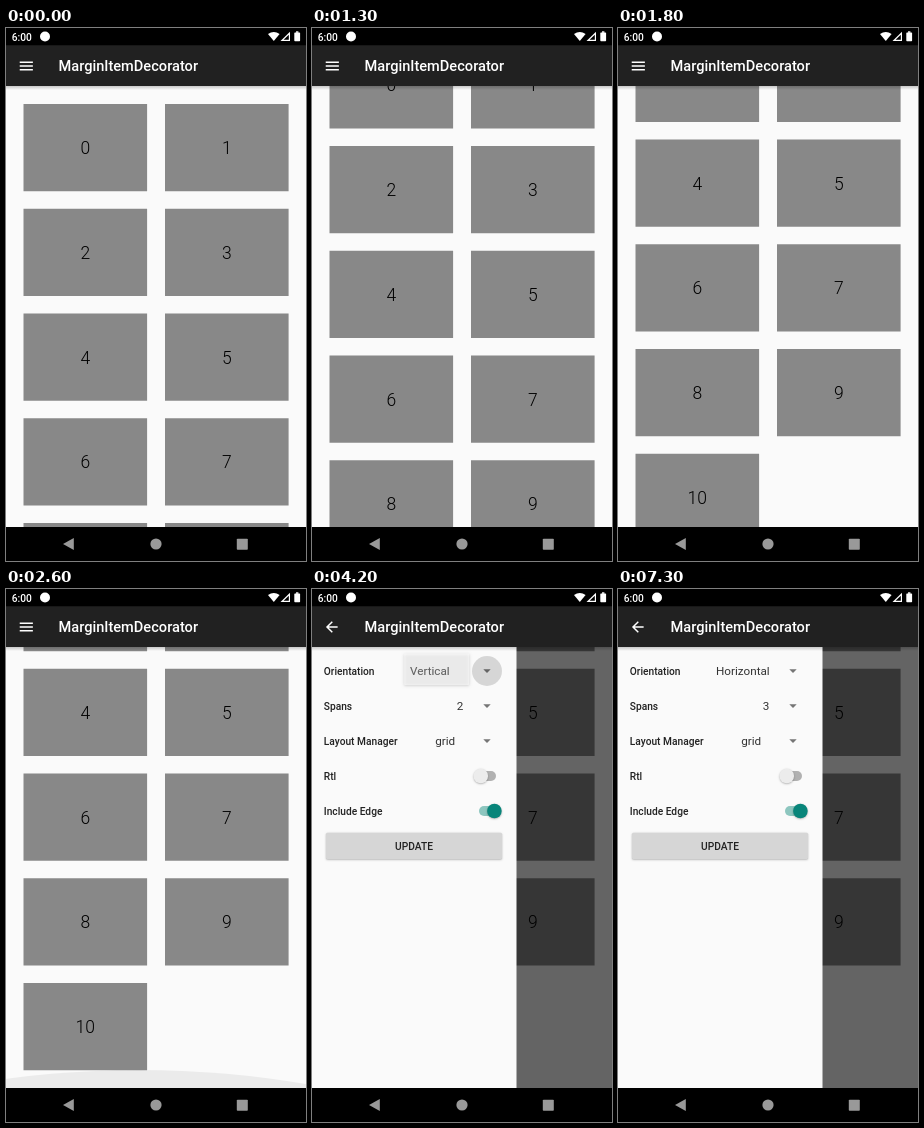
These frames come from a looping animation (300x533 px, 8000 ms). An HTML page with a canvas:

```html
<!DOCTYPE html>
<html lang="en">
<head>
<meta charset="utf-8">
<title>MarginItemDecorator</title>
<style>
  html, body { margin: 0; width: 100%; height: 100%; overflow: hidden; background: #000; }
  canvas { display: block; width: 100vw; height: 100vh; }
</style>
</head>
<body>
<canvas id="stage"></canvas>
<script>
const W = 300, H = 533, LOOP = 8000, STEP = 100;
const BAR_BOTTOM = 58, NAV_TOP = 499, DRAWER_WIDTH = 204.5, DP = 0.73;
const canvas = document.getElementById('stage');
const ctx = canvas.getContext('2d');

const clamp = v => Math.max(0, Math.min(1, v));
const lerp = (a, b, p) => a + (b - a) * p;

// Piecewise linear track of [time, value] pairs.
function track(t, keys) {
  if (t <= keys[0][0]) return keys[0][1];
  for (let i = 1; i < keys.length; i++) {
    const [t0, v0] = keys[i - 1], [t1, v1] = keys[i];
    if (t <= t1) return lerp(v0, v1, (t - t0) / (t1 - t0));
  }
  return keys[keys.length - 1][1];
}

function rect(x, y, w, h, color, radius = 0) {
  ctx.fillStyle = color;
  ctx.beginPath();
  ctx.roundRect(x, y, w, h, radius);
  ctx.fill();
}

function circle(x, y, r, color) {
  ctx.fillStyle = color;
  ctx.beginPath();
  ctx.arc(x, y, r, 0, Math.PI * 2);
  ctx.fill();
}

function polygon(color, ...points) {
  ctx.fillStyle = color;
  ctx.beginPath();
  points.forEach(([x, y]) => ctx.lineTo(x, y));
  ctx.closePath();
  ctx.fill();
}

// y is the middle of the capital letters.
function text(str, x, y, size, weight, color, align = 'left') {
  ctx.font = `${weight} ${size}px Roboto, sans-serif`;
  ctx.textAlign = align;
  ctx.fillStyle = color;
  ctx.fillText(str, x, y + size * 0.355);
}

function shadow(color, blur, dy) {
  ctx.shadowColor = color;
  ctx.shadowBlur = blur;
  ctx.shadowOffsetY = dy;
}

function clipped(x, y, w, h, draw) {
  ctx.save();
  ctx.beginPath();
  ctx.rect(x, y, w, h);
  ctx.clip();
  draw();
  ctx.restore();
}

function drawGrid(t) {
  const scroll = track(t, [[800, 0], [1000, 14], [1300, 62.75], [1800, 174], [1900, 194], [2000, 205.8]]);
  for (let i = 0; i <= 10; i++) {
    const x = i % 2 ? 159 : 17.5;
    const y = 76 + Math.floor(i / 2) * 104.75 - scroll;
    rect(x, y, 123.6, 87.3, '#888');
    text(i, x + 61.8, y + 44, 17.5, 300, '#000', 'center');
  }
}

// Overscroll glow: the cap of a flattened circle at the bottom edge.
function drawGlow(t) {
  if (t < 2200 || t >= 3200) return;
  const height = track(t, [[2200, 26], [2300, 33], [2400, 33], [2600, 18]]);
  const ry = 450 * height / 41;
  ctx.fillStyle = 'rgba(0,0,0,0.06)';
  ctx.beginPath();
  ctx.ellipse(133, NAV_TOP - height + ry, 450, ry, 0, 0, Math.PI * 2);
  ctx.fill();
}

function drawSwitch(y, on) {
  rect(on ? 167 : 165, y - 5, 19, 10, on ? '#8dc6bf' : '#b1b1b1', 5);
  ctx.save();
  shadow('rgba(0,0,0,0.3)', 2, 0.8);
  circle(on ? 182.4 : 168.8, y, 7.3, on ? '#08857a' : '#ececec');
  ctx.restore();
}

function drawSpinner(label, value, x, y) {
  text(label, 11.8, y, 10.2, 500, '#222');
  text(value, x, y, 11.7, 400, '#333');
  polygon('#757575', [171.3, y - 1.8], [178.7, y - 1.8], [175, y + 1.9]);
}

// Times: open = arrow tapped, press = item touched, close = popup starts to fade.
function drawPopup(t, { x, y, width, items, open, press, close, picked }) {
  const ripple = track(t, [[open - 100, 0], [open + 100, 1], [open + 400, 0]]);
  if (ripple && t >= open) {
    circle(175, y + 17.5, t === open ? 10 : 15, `rgba(0,0,0,${0.14 * ripple})`);
  }
  if (t <= open || t >= close + 200) return;
  const height = items.length * 35;
  const grown = track(t, [[open, 0], [open + 100, 0.45], [open + 200, 0.85], [open + 300, 1]]);
  ctx.save();
  ctx.globalAlpha = t < close ? clamp(grown * 1.3) : 0.6 - 0.35 * (t - close) / 100;
  ctx.save();
  shadow('rgba(0,0,0,0.3)', 3, 0.8);
  rect(x, y, width, height * grown, '#fff', 1);
  ctx.restore();
  clipped(x, y, width, height * grown, () => {
    if (t >= press) {
      rect(x, y + picked * 35, width, 35, `rgba(0,0,0,${t === press ? 0.07 : 0.13})`);
    }
    items.forEach((item, i) => text(item, x + 5.8, y + 17.5 + i * 35, 11.7, 400, '#333'));
  });
  ctx.restore();
}

const orientation = {
  x: 92.2, y: 64.5, width: 65, items: ['Vertical', 'Horizontal'],
  open: 4100, press: 4800, close: 5100, picked: 1
};
const spans = {
  x: 139, y: 99.5, width: 19, items: ['1', '2', '3'],
  open: 6000, press: 7000, close: 7100, picked: 2
};

function drawDrawer(t, progress) {
  if (!progress) return;
  rect(0, BAR_BOTTOM, W, NAV_TOP - BAR_BOTTOM, `rgba(0,0,0,${0.6 * progress})`);
  ctx.save();
  ctx.translate(DRAWER_WIDTH * (progress - 1), 0);
  rect(0, BAR_BOTTOM, DRAWER_WIDTH, NAV_TOP - BAR_BOTTOM, '#fafafa');
  drawSpinner('Orientation', t < orientation.close ? 'Vertical' : 'Horizontal', 98, 82);
  drawSpinner('Spans', t < spans.close ? '2' : '3', 144.8, 117);
  drawSpinner('Layout Manager', 'grid', 123.2, 152);
  text('Rtl', 11.8, 187, 10.2, 500, '#222');
  drawSwitch(187, false);
  text('Include Edge', 11.8, 222, 10.2, 500, '#222');
  drawSwitch(222, true);
  ctx.save();
  shadow('rgba(0,0,0,0.3)', 2, 0.8);
  rect(14, 243.7, 176, 26.3, '#d6d6d6', 1.5);
  ctx.restore();
  text('UPDATE', 102, 257, 10.2, 500, '#222', 'center');
  drawPopup(t, orientation);
  drawPopup(t, spans);
  ctx.restore();
}

// Menu bars that turn into a back arrow as progress goes from 0 to 1.
function drawMenuIcon(progress) {
  const angle = Math.PI / 4 * progress;
  const barLength = lerp(18, 8 * Math.SQRT2, progress);
  const dx = barLength * Math.cos(angle), dy = barLength * Math.sin(angle);
  const offset = lerp(5, -0.7, progress);
  const edge = lerp(-9, -8, progress);
  ctx.save();
  ctx.translate(20.3, 38);
  ctx.scale(DP, DP);
  ctx.rotate(Math.PI * (progress - 1));
  ctx.strokeStyle = '#fff';
  ctx.lineWidth = 2;
  ctx.beginPath();
  ctx.moveTo(edge + 0.7 * progress, 0);
  ctx.lineTo(-edge - 0.7 * progress, 0);
  for (const side of [1, -1]) {
    ctx.moveTo(edge, side * offset);
    ctx.lineTo(edge + dx, side * (offset + dy));
  }
  ctx.stroke();
  ctx.restore();
}

function drawAppBar(t, progress) {
  const fade = ctx.createLinearGradient(0, BAR_BOTTOM, 0, BAR_BOTTOM + 4);
  fade.addColorStop(0, 'rgba(0,0,0,0.2)');
  fade.addColorStop(1, 'rgba(0,0,0,0)');
  rect(0, BAR_BOTTOM, W, 4, fade);
  rect(0, 17, W, BAR_BOTTOM - 17, '#212121');
  if (t >= 3200 && t < 3600) {
    const alpha = track(t, [[3200, 0.12], [3300, 0.16], [3600, 0]]);
    circle(20.3, 38, 15, `rgba(255,255,255,${alpha})`);
  }
  drawMenuIcon(progress);
  text('MarginItemDecorator', 52.5, 38.2, 14.6, 500, '#fff');
}

function drawStatusBar() {
  rect(0, 0, W, 17.2, '#000');
  text('6:00', 5.8, 8.9, 10.2, 500, '#fff');
  circle(39, 8.5, 5, '#fff');
  ctx.fillStyle = '#fff';
  ctx.beginPath();
  ctx.moveTo(267.8, 13);
  ctx.lineTo(262, 6);
  ctx.quadraticCurveTo(267.8, 1.8, 273.6, 6);
  ctx.fill();
  polygon('#fff', [274.5, 13], [284, 13], [284, 3.8]);
  polygon('#000', [277.6, 11.8], [282.8, 11.8], [282.8, 6.8]);
  rect(288.3, 4.4, 5.8, 8.8, '#fff', 0.7);
  rect(290, 3.3, 2.4, 1.5, '#fff');
}

function drawNavBar() {
  rect(0, NAV_TOP, W, H - NAV_TOP, '#000');
  polygon('#999', [57, 516], [67.8, 510], [67.8, 522]);
  circle(150, 516, 5.6, '#999');
  rect(230.8, 510.8, 11, 11, '#999', 0.8);
}

function render(t) {
  // The drawer settles with a quintic ease-out.
  const progress = t < 3200 ? 0 : 1 - (1 - clamp((t - 3124) / 512)) ** 5;
  rect(0, 0, W, H, '#fafafa');
  clipped(0, BAR_BOTTOM, W, NAV_TOP - BAR_BOTTOM, () => {
    drawGrid(t);
    drawGlow(t);
    drawDrawer(t, progress);
  });
  drawAppBar(t, progress);
  drawStatusBar();
  drawNavBar();
}

function resize() {
  const ratio = window.devicePixelRatio || 1;
  canvas.width = Math.round(innerWidth * ratio);
  canvas.height = Math.round(innerHeight * ratio);
  ctx.setTransform(canvas.width / W, 0, 0, canvas.height / H, 0, 0);
}

const start = performance.now();
function frame() {
  const elapsed = (performance.now() - start) % LOOP;
  render(Math.floor(elapsed / STEP) * STEP);
  requestAnimationFrame(frame);
}

addEventListener('resize', resize);
resize();
frame();
</script>
</body>
</html>
```
